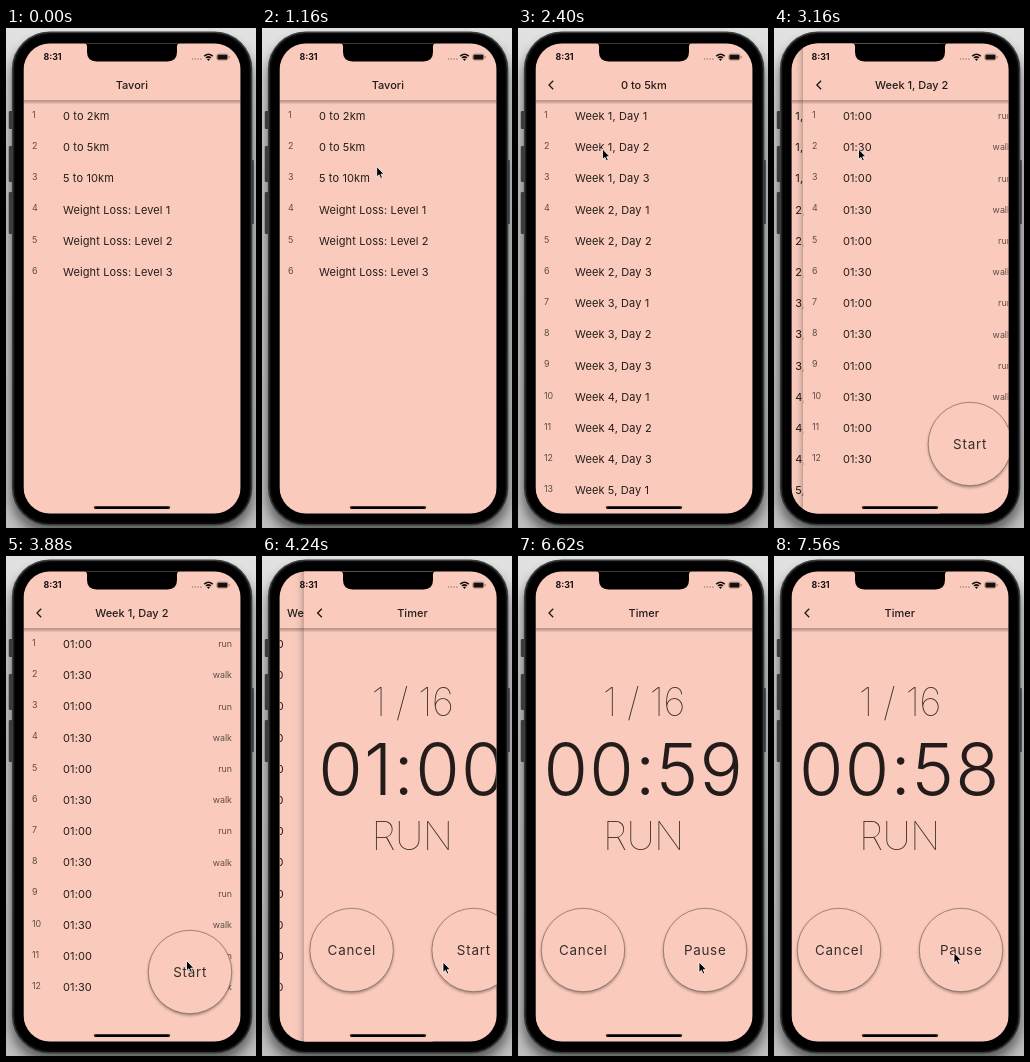
Recreate the animation shown at these times as an HTML page. Size 250 by 500 pixels, loop 8000 ms.

```html
<!DOCTYPE html>
<html lang="en">
<head>
<meta charset="utf-8">
<title>Interval timer</title>
<style>
html, body { margin: 0; width: 100%; height: 100%; overflow: hidden; background: #ccc; }
svg { display: block; width: 250px; height: 500px; background: linear-gradient(#e2e2e2, #cdcdcd 30%, #c0c0c0); }
text { font-family: Inter, Roboto, "Liberation Sans", sans-serif; fill: #241c1a; white-space: pre; }
.title { font-size: 11px; font-weight: 500; text-anchor: middle; }
.row { font-size: 11px; letter-spacing: .12px; }
.small { font-size: 8.9px; fill: #5e4c47; }
.clock { font-size: 72px; font-weight: 300; letter-spacing: 1.3px; text-anchor: middle; }
.thin { font-size: 39.4px; font-weight: 100; letter-spacing: -.7px; text-anchor: middle; fill: #3a2f2c; }
.button { font-size: 13.4px; letter-spacing: .75px; text-anchor: middle; fill: #372d2a; }
.time { font-size: 8.8px; font-weight: 700; fill: #15100f; }
</style>
</head>
<body>
<svg viewBox="0 0 250 500" xmlns="http://www.w3.org/2000/svg">
  <defs>
    <clipPath id="screen"><rect x="17.600" y="15.600" width="217" height="469.800" rx="26"/></clipPath>
    <linearGradient id="barShade" x2="0" y2="1">
      <stop stop-color="#000" stop-opacity=".36"/>
      <stop offset=".4" stop-color="#000" stop-opacity=".17"/>
      <stop offset="1" stop-color="#000" stop-opacity="0"/>
    </linearGradient>
    <linearGradient id="edgeShade" x1="1" x2="0">
      <stop stop-color="#000" stop-opacity=".22"/>
      <stop offset=".3" stop-color="#000" stop-opacity=".08"/>
      <stop offset=".6" stop-color="#000" stop-opacity=".02"/>
      <stop offset="1" stop-color="#000" stop-opacity="0"/>
    </linearGradient>
    <filter id="soft" x="-20%" y="-20%" width="140%" height="140%"><feGaussianBlur stdDeviation="1.4"/></filter>
    <filter id="wide" x="-20%" y="-20%" width="140%" height="140%"><feGaussianBlur stdDeviation="6"/></filter>
  </defs>

  <rect x="5" y="12" width="242" height="494" rx="38" opacity=".5" filter="url(#wide)"/>
  <g fill="#3b3c3f">
    <rect x="2.800" y="83" width="5" height="18" rx="1"/>
    <rect x="2.800" y="118" width="5" height="36" rx="1"/>
    <rect x="2.800" y="164" width="5" height="42" rx="1"/>
    <rect x="244" y="132" width="3.800" height="64" rx="1"/>
  </g>
  <rect x="6.700" y="4.200" width="238.800" height="492.600" rx="37" fill="#0b0b0c" stroke="#3a3b3e" stroke-width="1.600"/>
  <rect x="9" y="6.500" width="234.200" height="488" rx="35"/>

  <g clip-path="url(#screen)">
    <g id="pages"></g>
    <path d="M78 15Q81 15.500 81 18.500V24Q81 33.400 90.500 33.400H161.500Q171 33.400 171 24V18.500Q171 15.500 174 15Z"/>
    <text class="time" x="37.500" y="32.300">8:31</text>
    <g fill="#a0786d">
      <circle cx="186.500" cy="31" r=".8"/><circle cx="189.300" cy="31" r=".8"/>
      <circle cx="192.100" cy="31" r=".8"/><circle cx="194.900" cy="31" r=".8"/>
    </g>
    <path d="M198.200 28.100Q202.500 24.300 206.800 28.100M200 30Q202.500 27.800 205 30" fill="none" stroke="#15100f" stroke-width="1.500"/>
    <path d="M201 31.200Q202.500 30 204 31.200L202.500 32.900Z" fill="#15100f"/>
    <rect x="210.900" y="26.100" width="11" height="5.900" rx="1.800" fill="none" stroke="#6b544d" stroke-width=".6"/>
    <rect x="211.500" y="26.700" width="9.800" height="4.700" rx="1.200" fill="#15100f"/>
    <path d="M222.800 28v2.200q.9-.2 .9-1.100t-.9-1.100" fill="#6b544d"/>
    <rect x="88" y="478.200" width="76" height="2.800" rx="1.400"/>
  </g>
  <path id="cursor" d="M0 0V10.500L2.400 8.300 4 12 5.800 11.200 4.200 7.700H7.400Z" fill="#000" stroke="#fff" stroke-width=".8" stroke-linejoin="round"/>
</svg>
<script>
const LOOP = 8000, LEFT = 17.3, WIDTH = 217.4, BAR = 72.3, PITCH = 31.2;
const PINK = '#facbbd';

function add(parent, tag, attrs = {}, text) {
  const el = document.createElementNS('http://www.w3.org/2000/svg', tag);
  for (const key in attrs) el.setAttribute(key, attrs[key]);
  if (text !== undefined) el.textContent = text;
  parent.append(el);
  return el;
}

const label = (parent, cls, x, y, text, more) => add(parent, 'text', { class: cls, x, y, ...more }, text);
const rowY = i => BAR + PITCH * (i + .5);

function makePage(title, back = true) {
  const page = add(document.getElementById('pages'), 'g');
  add(page, 'rect', { x: LEFT - 11, y: 15, width: 11, height: 471, fill: 'url(#edgeShade)' });
  add(page, 'rect', { x: LEFT, y: 15, width: WIDTH, height: 471, fill: PINK });
  add(page, 'rect', { x: LEFT, y: BAR, width: WIDTH, height: 4.4, fill: 'url(#barShade)' });
  label(page, 'title', 125.8, 61, title);
  if (back) add(page, 'path', { d: 'M35.2 52.8L31 57L35.2 61.2', fill: 'none', stroke: '#1c1513', 'stroke-width': 1.3 });
  return page;
}

function addRow(page, i, text, trailing) {
  const y = rowY(i);
  label(page, 'small', 26, y + 1.9, i + 1);
  label(page, 'row', 57, y + 4.1, text);
  if (trailing) label(page, 'small', 226, y + 3.2, trailing, { 'text-anchor': 'end' });
}

function makeButton(page, x, y, text) {
  add(page, 'circle', { cx: x, cy: y + 1.6, r: 41.8, opacity: .36, filter: 'url(#soft)' });
  add(page, 'circle', { cx: x, cy: y, r: 41.7, fill: PINK, stroke: '#69564f', 'stroke-width': .6 });
  const splash = add(page, 'circle', { cx: x, cy: y, r: 0, opacity: 0 });
  return { splash, text: label(page, 'button', x + .2, y + 4.9, text) };
}

const plans = makePage('Tavori', false);
const highlight = add(plans, 'rect', { x: LEFT, y: BAR + PITCH, width: WIDTH, height: PITCH, opacity: 0 });
['0 to 2km', '0 to 5km', '5 to 10km', 'Weight Loss: Level 1', 'Weight Loss: Level 2', 'Weight Loss: Level 3']
  .forEach((name, i) => addRow(plans, i, name));

const days = makePage('0 to 5km');
for (let i = 0; i < 13; i++) addRow(days, i, `Week ${Math.floor(i / 3) + 1}, Day ${i % 3 + 1}`);

const steps = makePage('Week 1, Day 2');
for (let i = 0; i < 12; i++) addRow(steps, i, i % 2 ? '01:30' : '01:00', i % 2 ? 'walk' : 'run');
const openTimer = makeButton(steps, 184, 416, 'Start');

const timer = makePage('Timer');
label(timer, 'thin', 125.8, 160.2, '1 / 16');
const clock = label(timer, 'clock', 125.8, 239.3, '01:00');
label(timer, 'thin', 125.3, 293.5, 'RUN');
makeButton(timer, 65, 394, 'Cancel');
const toggle = makeButton(timer, 187, 394, 'Start');

const pages = [plans, days, steps, timer];
const cursor = document.getElementById('cursor');

const clamp = v => Math.min(1, Math.max(0, v));
const smooth = v => v * v * (3 - 2 * v);

// Cubic curve (.35,.91) (.33,.97), solved by bisection
function slideEase(x) {
  if (x <= 0 || x >= 1) return clamp(x);
  const at = (s, a, b) => 3 * (1 - s) * (1 - s) * s * a + 3 * (1 - s) * s * s * b + s * s * s;
  let lo = 0, hi = 1;
  for (let i = 0; i < 24; i++) {
    const mid = (lo + hi) / 2;
    if (at(mid, .35, .33) < x) lo = mid; else hi = mid;
  }
  return at(lo, .91, .97);
}

// start of each slide, and the time it first shows
const slides = [[1705, 1705], [2880, 3040], [4019, 4019]];
const slideAt = (t, [start, shown]) => t < shown ? 0 : slideEase((t - start) / 500);

// time, x, y
const path = [
  [760, 217, 27], [1140, 116, 138], [1300, 88, 149], [1500, 84.5, 121],
  [3460, 84.5, 121], [3900, 181, 406],
  [6960, 181, 406], [7560, 180, 396.5]
];

function cursorAt(t) {
  let i = path.length - 1;
  while (i > 0 && path[i][0] > t) i--;
  const a = path[i], b = path[i + 1] || a;
  const k = b === a ? 0 : smooth(clamp((t - a[0]) / (b[0] - a[0])));
  return [a[1] + (b[1] - a[1]) * k, a[2] + (b[2] - a[2]) * k];
}

function press(button, t, start, length) {
  const k = clamp((t - start) / length);
  button.splash.setAttribute('r', 41.5 * clamp(k * 1.8));
  button.splash.setAttribute('opacity', k > 0 && k < 1 ? .1 * Math.min(1, (1 - k) * 2) : 0);
}

function render(t) {
  const shown = [1, ...slides.map(s => slideAt(t, s)), 0];
  pages.forEach((page, i) => {
    const x = WIDTH * (1 - shown[i]) - WIDTH / 3 * shown[i + 1];
    page.setAttribute('transform', `translate(${x.toFixed(2)} 0)`);
    page.setAttribute('visibility', shown[i] > 0 && shown[i + 1] < 1 ? 'visible' : 'hidden');
  });

  highlight.setAttribute('opacity', .08 * clamp((t - 1590) / 100) * clamp((2050 - t) / 300));
  press(openTimer, t, 3920, 300);
  press(toggle, t, 4930, 310);
  toggle.text.textContent = t < 5040 ? 'Start' : 'Pause';
  clock.textContent = t < 6200 ? '01:00' : t < 7200 ? '00:59' : '00:58';

  const [x, y] = cursorAt(t);
  cursor.setAttribute('transform', `translate(${x.toFixed(2)} ${y.toFixed(2)})`);
  cursor.setAttribute('visibility', t < 760 ? 'hidden' : 'visible');
}

const begin = performance.now();
function tick() {
  render((performance.now() - begin) % LOOP);
  requestAnimationFrame(tick);
}
tick();
</script>
</body>
</html>
```
